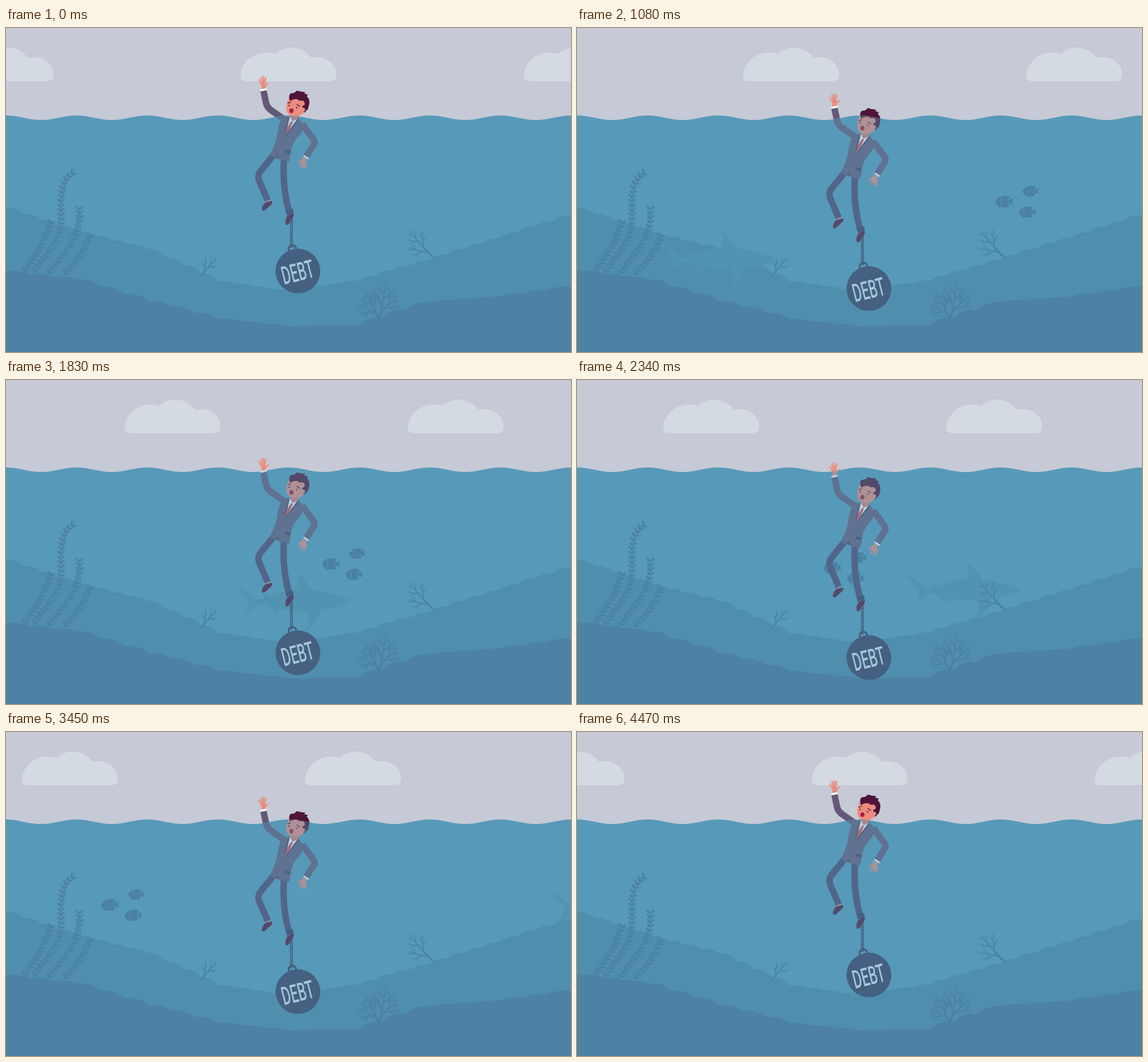
An HTML page for the animation above (4500 ms loop, 870x500 px).

```html
<!DOCTYPE html>
<html lang="en">
<head>
<meta charset="utf-8">
<title>Sinking in debt</title>
<style>
  html, body { margin: 0; width: 100%; height: 100%; overflow: hidden; background: #c5cad6 }
  svg { display: block; width: 870px; height: 500px }
  .line { fill: none; stroke-linecap: round; stroke-linejoin: round }
  .limb { fill: none; stroke-linejoin: round }
  .skin { fill: #ea8c7e; stroke: #ea8c7e; stroke-width: 2.2 }
</style>
</head>
<body>
<svg viewBox="0 0 870 500">
  <defs>
    <clipPath id="above"><path id="skyArea"/></clipPath>
    <clipPath id="below"><path id="waterArea"/></clipPath>
    <filter id="tint" color-interpolation-filters="sRGB">
      <feColorMatrix values=".6 0 0 0 .136  0 .6 0 0 .24  0 0 .6 0 .289  0 0 0 1 0"/>
    </filter>
    <path id="cloud" fill="#d4dae2" d="M9,82Q0,82 0,72A40,40 0 0 1 53,40A38,38 0 0 1 109,46C130,41 148,55 148,72Q148,82 138,82Z"/>
    <g id="fish">
      <path fill="#4a81a5" d="M0,1C4,-8 14,-11 23,-7L21,-2 28,-5 26,0 28,5 21,3 21,8C16,10 10,9 8,8L9,11 5,8Q2,5 0,1Z"/>
      <path class="line" stroke="#5595b5" d="M8,-5Q11,1 9,6M20,-4q2,4 0,7"/>
    </g>

    <g id="man">
      <!-- chain and ball -->
      <path id="chain" class="line" stroke="#3a3a5a" stroke-width="1.5"/>
      <circle cx="441" cy="341" r="5.8" fill="none" stroke="#3a3a5a" stroke-width="3"/>
      <circle cx="449.5" cy="375" r="34.5" fill="#3a3a5a"/>
      <text transform="translate(449 376.5) rotate(-14) scale(.54 1)" y="13.5" text-anchor="middle"
        font-family="Roboto, sans-serif" font-size="38" fill="#d9e9f8" stroke="#d9e9f8" stroke-width=".7">DEBT</text>

      <!-- legs -->
      <path class="line" stroke="#d98078" stroke-width="6" d="M401,262l2,6M436,282l1,8"/>
      <path id="shoe" fill="#521437" d="M400,269L409,267Q412,269 408,273L399,281Q395,284 394,280Q394,274 400,269Z"/>
      <use href="#shoe" transform="rotate(-16 402 275) translate(28 29)"/>
      <path class="limb" stroke="#4e426b" stroke-width="10" d="M412,196L391,222Q387,229 390,236L403,266M428,202Q425,245 436,284"/>
      <path fill="#3a3a5a" d="M431,281l11,-2 1,8 -11,2z"/>

      <!-- hands -->
      <g class="skin">
        <path class="line" stroke-width="7" d="M397,88l-.5,4M459,203l-1.5,4"/>
        <path class="line" d="M394,88l-4.700,-8M395,86l-2.300,-10M396.500,85v-10M398,86l2,-9.500M398,90l5.700,-5"/>
        <path class="line" d="M456,203l-6,5M456,206l-3,8M458,207l-1,9M459,207l2,9M460,205l3,6"/>
      </g>
      <path class="line" stroke="#fff" stroke-width="3" d="M393,96l7,-1.5M459.5,197l5.5,4"/>

      <!-- suit -->
      <path class="limb" stroke="#645877" stroke-width="10" d="M396.5,97L400.5,116Q402,122 407,126L430,142M456,148L473,171Q477,176 473,181L462.5,198"/>
      <path fill="#645877" d="M434,136L450,139 460,151 454,163Q442,175 440,185L436,206Q420,204 406,196Q414,182 417,168Q419,150 425,139Z"/>
      <path fill="#fff" d="M437,137L449,140 431,164Z"/>
      <path fill="#e04c4c" d="M439,144L442,145 436,158 430,165 431,157Z"/>
      <path class="line" stroke="#443a62" stroke-width="1.4" d="M435,139L430,162M450,141L431,166"/>
      <path fill="#443a62" d="M430,188l8,2 -.5,4 -8,-2zM418,196l3,5 -6,-2z"/>

      <!-- head -->
      <path fill="#dc7b70" d="M440,131L453,130 448,141 441,144 438,138Z"/>
      <path fill="#ea8c7e" d="M435,108Q429,124 433,130Q437,137 444,136Q455,137 459,129L463,112 446,104Z"/>
      <path fill="#4f1438" d="M438,113Q434,106 438,101L444,100 448,96.5 453,98 461,99 459,101 465,103 463,105Q468,110 467,117L465,125 459,131 457,126 456,121 460,118Q460,111 455,112Q451,113 449,110Q442,109 438,113Z"/>
      <circle cx="457.5" cy="126" r="3" fill="#ea8c7e"/>
      <ellipse cx="439.5" cy="127.5" rx="3.2" ry="3.6" fill="#a3203f"/>
      <path class="line" stroke="#4f1438" stroke-width="1.3" d="M434,116l4,-1.5M448,118l4,3"/>
      <path class="line" stroke="#4f1438" stroke-width="2.2" d="M436,119.5h.1M447.5,123h.1"/>
    </g>
  </defs>

  <rect width="870" height="500" fill="#c5cad6"/>
  <g id="clouds">
    <use href="#cloud" x="-75"/><use href="#cloud" x="361"/><use href="#cloud" x="797"/><use href="#cloud" x="1233"/>
  </g>
  <path id="water" fill="#5799b8"/>
  <path id="backSand" fill="#508eae"/>
  <path id="frontSand" fill="#4d82a4"/>
  <path id="shark" fill="#5293b2" d="M85,44Q55,31 24,28Q14,10 0,0Q6,13 2,26Q-20,30 -40,38L-50,34 -49,41 -62,43Q-80,24 -98,20Q-78,34 -72,46Q-73,57 -83,67Q-68,57 -57,50L-42,53Q-36,63 -26,66Q-28,61 -26,57Q-5,63 16,59Q22,72 17,91Q30,80 39,58Q66,56 85,44Z"/>
  <g id="plants" class="line" stroke="#4a81a4"></g>
  <g id="shoal">
    <use href="#fish"/>
    <use href="#fish" transform="translate(42 -16) scale(.9)"/>
    <use href="#fish" transform="translate(36 16) scale(.97)"/>
  </g>
  <g clip-path="url(#above)"><use href="#man"/></g>
  <g clip-path="url(#below)"><g filter="url(#tint)"><use href="#man"/></g></g>
</svg>

<script>
const WIDTH = 870, LOOP = 4500, TRAVEL = 4470;
const $ = id => document.getElementById(id);
const setPath = (id, d) => $(id).setAttribute('d', d);
const place = (id, x, y) => $(id).setAttribute('transform', `translate(${x} ${y})`);

function addPlant(d, width) {
  const path = document.createElementNS('http://www.w3.org/2000/svg', 'path');
  path.setAttribute('d', d);
  path.setAttribute('stroke-width', width);
  $('plants').append(path);
  return path;
}

// Evenly spaced heights joined by mounds that lean towards the higher side
function sand(heights, mounds) {
  const spans = heights.length - 1, count = spans * mounds, step = WIDTH / count;
  const heightAt = i => {
    const k = Math.min(Math.floor(i / mounds), spans - 1);
    return heights[k] + (heights[k + 1] - heights[k]) * (i / mounds - k);
  };
  let d = `M0,${heights[0]}`;
  for (let i = 1; i <= count; i++) {
    const before = heightAt(i - 1), y = heightAt(i);
    const lean = y > before ? .7 : .3;
    d += `Q${(i - 1 + lean) * step},${Math.min(before, y) - 1} ${i * step},${y}`;
  }
  return d + 'V500H0Z';
}

function seaweed(d) {
  const stem = addPlant(d, 1.3), length = stem.getTotalLength();
  let leaves = '';
  for (let s = 3; s < length; s += 7) {
    const a = stem.getPointAtLength(s), b = stem.getPointAtLength(s + 1);
    const heading = Math.atan2(b.y - a.y, b.x - a.x);
    for (const side of [-.75, .75]) {
      const dx = Math.cos(heading + side), dy = Math.sin(heading + side);
      leaves += `M${a.x + 2 * dx},${a.y + 2 * dy}l${4.5 * dx},${4.5 * dy}`;
    }
  }
  addPlant(leaves, 2.7);
}

// Each joint bends the stem one way and sends a twig the other way
function coral(x, y, angle, length, width, side = 1) {
  if (width < .9) return;
  const x2 = x + length * Math.cos(angle), y2 = y + length * Math.sin(angle);
  addPlant(`M${x},${y}L${x2},${y2}`, width);
  coral(x2, y2, angle + .2 * side, length * .85, width * .84, -side);
  coral(x2, y2, angle - .65 * side, length * .72, width * .74, side);
}

const wave = 'M0,135' + 'c20,0 34,7 54.4,7c20,0 34,-7 54.4,-7'.repeat(8);
setPath('skyArea', wave + 'V0H0Z');
setPath('waterArea', wave + 'V500H0Z');
setPath('water', wave + 'V500H0Z');
setPath('backSand', sand([278, 314, 341, 391, 407, 390, 358, 324, 289], 4));
setPath('frontSand', sand([375, 388, 421, 449, 461, 459, 423, 415, 399], 3));

['M25,377Q57,342 69,298', 'M41,379C60,350 86,330 85,290C83,250 87,232 105,222',
  'M64,381C85,350 116,330 113,278', 'M87,382Q115,357 129,322'].forEach(seaweed);
coral(301, 382, -.95, 9, 2.2);
coral(658, 354, -2.4, 13, 2.6);
coral(574, 462, -1.5, 14, 4.5);

let links = '';
for (let y = 289; y < 334; y += 5.6) links += `M439.5,${y}a1.7,2.4 0 1 1 -.01,4.8a1.7,2.4 0 1 1 .01,-4.8`;
setPath('chain', links);

function draw() {
  const t = performance.now() % LOOP;
  const p = Math.min(t / TRAVEL, 1);
  const sink = 1 - Math.abs(2 * p - 1);
  place('clouds', -436 * p, 0);
  place('man', 0, 56 * sink);
  place('shoal', 871 - 939 * p, 245 + 47 * sink);
  place('shark', -103 + .3 * t, 317 + .005 * t - 9e-6 * t * t);
  requestAnimationFrame(draw);
}
draw();
</script>
</body>
</html>
```
